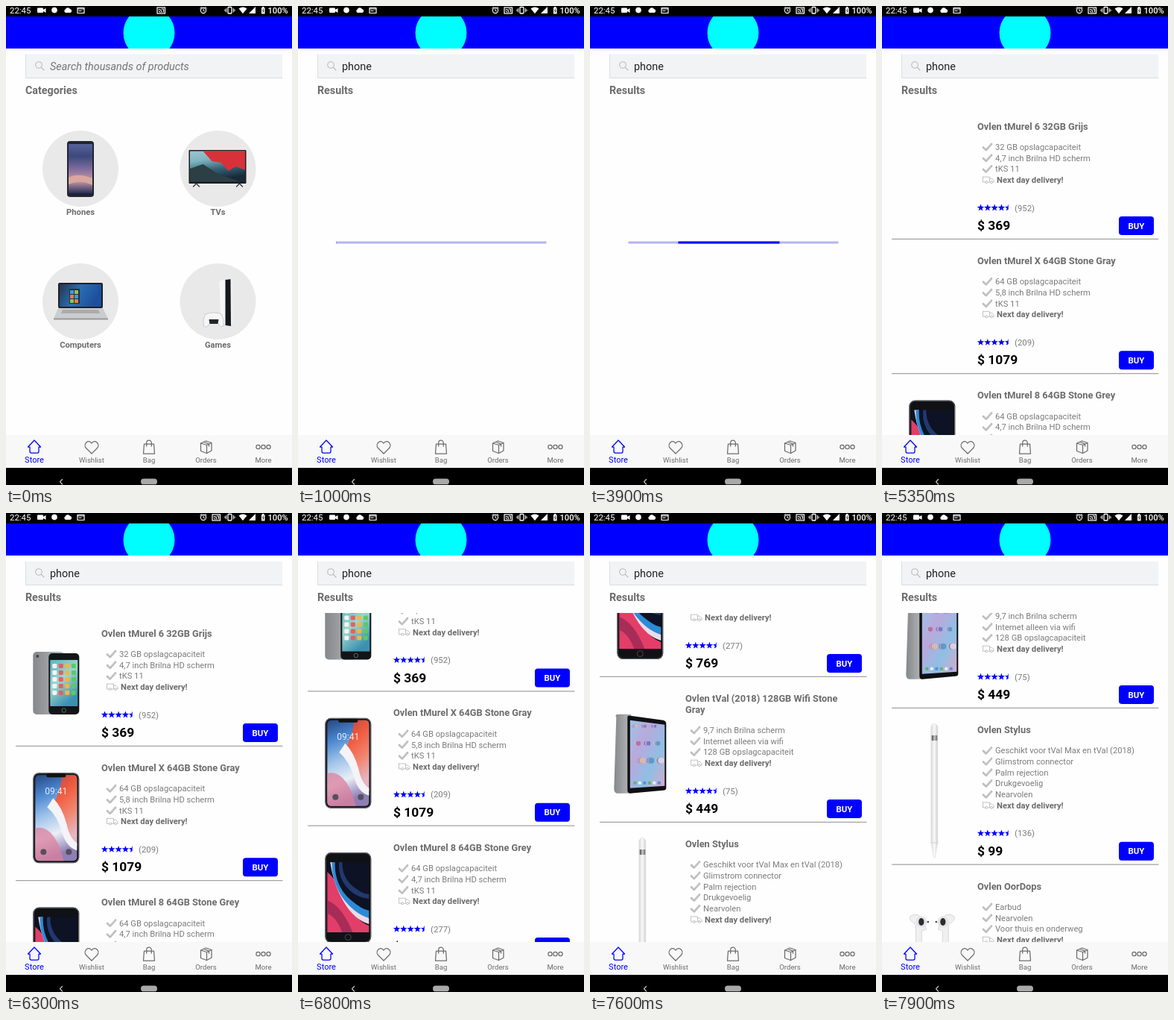
An HTML page for the animation above (8000 ms loop, 384x642 px).

```html
<!DOCTYPE html>
<html lang="en">
<head>
<meta charset="utf-8">
<title>Shop search</title>
<style>
  html, body { margin: 0; width: 100%; height: 100%; overflow: hidden; background: #fdfefd; }
  svg { display: block; width: 384px; height: 642px; font-family: Roboto, Arial, sans-serif; }
  .bold { font-weight: 700; }
  .mid { text-anchor: middle; }
  .line { fill: none; stroke-linecap: round; stroke-linejoin: round; }
</style>
</head>
<body>
<svg id="stage" viewBox="0 0 384 642" xmlns="http://www.w3.org/2000/svg"></svg>
<script>
const LOOP = 8000;
const BLUE = '#0000fe';
const GRAY = '#6c6c6c';
const SOFT = '#7c7c7c';

const rect = (x, y, w, h, fill, rx = 0, more = '') =>
  `<rect x="${x}" y="${y}" width="${w}" height="${h}" fill="${fill}" rx="${rx}" ${more}/>`;
const circle = (x, y, r, fill, more = '') =>
  `<circle cx="${x}" cy="${y}" r="${r}" fill="${fill}" ${more}/>`;
const path = (d, fill, more = '') => `<path d="${d}" fill="${fill}" ${more}/>`;
const line = (d, color, width = 1) =>
  `<path class="line" d="${d}" stroke="${color}" stroke-width="${width}"/>`;
const text = (x, y, size, fill, str, cls = '', more = '') =>
  `<text x="${x}" y="${y}" font-size="${size}" fill="${fill}" class="${cls}" ${more}>${str}</text>`;
const group = (x, y, body, more = '') => `<g transform="translate(${x} ${y})" ${more}>${body}</g>`;
const gradient = (id, x2, y2, ...colors) =>
  `<linearGradient id="${id}" x1="0" y1="0" x2="${x2}" y2="${y2}">` +
  colors.map((c, i) => `<stop offset="${i / (colors.length - 1)}" stop-color="${c}"/>`).join('') +
  '</linearGradient>';

const defs = `<defs>
  ${gradient('dusk', 0, 1, '#56629b', '#3c487c', '#7d6b9c', '#c99aa5', '#27305c')}
  ${gradient('lake', 0.3, 1, '#9fc4cf', '#7db4c2', '#356474', '#172b3b')}
  ${gradient('desk', 1, 0.3, '#26364f', '#2b6cb4', '#1c4f9c')}
  ${gradient('aqua', 0.5, 1, '#5fb3bd', '#9fd6cf', '#3b91b0')}
  ${gradient('sky', 0.2, 1, '#27467f', '#4a86cf', '#9fc3ea', '#e9eef6', '#8e7fb4')}
  ${gradient('fire', 0.3, 1, '#b8474a', '#ee5a3f', '#f2836c', '#e6b5c0')}
  ${gradient('paint', 1, 1, '#9cc4e6', '#b9a9dc', '#8fbfe4', '#d9a9c9')}
  ${gradient('steel', 1, 0, '#85878b', '#b9babd')}
  ${gradient('stick', 1, 0, '#d8d8d8', '#fafafa', '#cfcfcf')}
  <clipPath id="head"><rect y="14" width="384" height="43"/></clipPath>
  <clipPath id="list"><rect y="134" width="384" height="441"/></clipPath>
</defs>`;

// Fixed frame of the app

const castIcon = rect(-5, -4, 10.5, 8, 'none', 0, 'stroke="#fff" stroke-width="1.2"') +
  line('M-3 -1.5A4 4 0 0 1 1 2.5M-3 .8A2 2 0 0 1 -1.2 2.5M1 -2H3.5V2', '#fff', 1.1);

function statusBar() {
  return rect(0, 0, 384, 14, '#000') +
    text(5, 9.8, 11.4, '#fff', '22:45') +
    rect(42, 2.5, 8, 6.5, '#fff', 1) + path('M49 5.5L53.5 3V9L49 6.5Z', '#fff') +
    circle(65, 5.6, 3.8, '#fff') +
    path('M80 9A2.4 2.4 0 0 1 79.6 4.6A3.6 3.6 0 0 1 86 4A2.6 2.6 0 0 1 86.5 9Z', '#fff') +
    line('M96 2.5H105V9.5H96ZM96 4H105M98 6.5H101', '#fff', 1.2) +
    circle(265, 6, 3.6, 'none', 'stroke="#fff" stroke-width="1.1"') +
    line('M265 4V6.3L266.5 7M260.8 3L262.6 1.6M267.4 1.6L269.2 3', '#fff') +
    rect(298, 1.5, 5, 8.5, 'none', 1, 'stroke="#fff" stroke-width="1.3"') +
    line('M295.7 3.5V8M294 4.8V6.8M305.3 3.5V8M307 4.8V6.8', '#fff') +
    path('M312.5 3.6Q318 -.6 323.5 3.6L318 10.3Z', '#fff') +
    path('M335 1V10H326Z', '#fff') +
    path('M343 2.2H344.2V1H346.2V2.2H347.5V10.5H343Z', '#fff') +
    line('M345.6 4L344.6 6.4H346L345 8.6', '#000', 0.8) +
    text(351.5, 9.8, 11.2, '#fff', '100%', '', 'font-weight="500"');
}

function header() {
  return rect(0, 14, 384, 43, BLUE) + circle(192, 36, 34.5, '#00fdff', 'clip-path="url(#head)"');
}

function tab(x, label, icon, color = GRAY, size = 9.6) {
  return group(x, 591, line(icon, color, 1.25)) + text(x, 611.8, size, color, label, 'mid');
}

const ring = x => `M${x - 2.6} 0a2.6 2.6 0 1 0 5.2 0a2.6 2.6 0 1 0 -5.2 0`;

function tabBar() {
  return rect(0, 575, 384, 44, '#f7f8f7') +
    tab(38, 'Store', 'M-8.5 0L0 -9L8.5 0H6V6Q6 8 4 8H-4Q-6 8 -6 6V0Z', BLUE, 11) +
    tab(115, 'Wishlist', 'M0 9L-7.5 1.5C-12 -4 -4.5 -11 0 -5C4.5 -11 12 -4 7.5 1.5Z') +
    tab(192, 'Bag', 'M-6.5 -4H6.5L7.5 9H-7.5ZM-3.3 -1V-5.5A3.3 3.3 0 0 1 3.3 -5.5V-1') +
    tab(268.5, 'Orders', 'M-7 -5L0 -8L7.5 -5.5V5L1 8.5L-7 5.5ZM-7 -5L1 -2.5L7.5 -5.5M1 -2.5V8.5M-3 -6.6L4 -4V-1') +
    tab(345.5, 'More', ring(-7) + ring(0) + ring(7));
}

function navBar() {
  return rect(0, 619, 384, 23, '#000') +
    line('M75.5 634.5L72.5 637.7L75.5 641', '#ccc', 1.2) +
    rect(181, 633.5, 22, 7.8, '#a9a9a9', 3.9);
}

function searchBox() {
  return rect(26, 65, 345, 31.5, '#f1f3f4') + line('M26.5 65V96.5H371', '#dcdfe0') +
    circle(44, 79, 4.3, 'none', 'stroke="#b9bcbc" stroke-width="1.1"') +
    line('M47.2 82.2L51 86', '#b9bcbc', 1.2) +
    text(59, 86, 14.4, '#757575', 'Search thousands of products', '', 'id="hint" font-style="italic"') +
    text(59, 86, 14.4, '#222', '', '', 'id="query"');
}

// Store page

function category(x, y, label, art) {
  return group(x, y, circle(0, 0, 51, '#e9e9e9') + art + text(0, 61.5, 11.2, GRAY, label, 'bold mid'));
}

function store() {
  const phone = rect(-18, -37, 36, 75, '#22242f', 4) + rect(-16, -33, 32, 66, 'url(#dusk)', 1) +
    path('M-16 12Q-4 5 16 13V22Q0 14 -16 21Z', '#dba6a0');
  const tv = rect(-39, -25, 77, 45, '#1c1d20', 1) + rect(-37.5, -23.5, 74, 41, 'url(#lake)') +
    path('M-20 -23.5H36.5V2L24 -3L14 3L4 -8L-8 -10Z', '#d7323a') +
    path('M-37.5 0L-20 -6L2 8L30 17.5H-37.5Z', '#2b3f45') +
    line('M-29 20L-33 24M-29 20L-25 24M29 20L25 24M29 20L33 24', '#333', 1.3);
  const laptop = rect(-30, -25, 60, 34, '#1d2027', 2) + rect(-28, -23, 56, 30, 'url(#desk)') +
    rect(-15, -17, 14, 20, '#24303f') +
    [0, 1, 2, 3, 4, 5].map(i => rect(-14 + i % 2 * 6, -15 + (i >> 1) * 6, 5, 5, ['#3d9ad8', '#8fc257', '#d8834c'][i % 3])).join('') +
    path('M-30 9H30L37 23H-36Z', '#cbccce') + path('M-24 11H24L26 16H-26Z', '#a9abaf') +
    rect(-36, 22.5, 73, 2, '#999');
  const console = path('M2 -27Q8 -31 11 -28L12 29L4 32Z', '#f5f6f8') +
    path('M10 -29L18 -30Q20 0 18 33L10 32Z', '#17181c') + path('M17 -30H20L20.5 31L17.5 33Z', '#eceef2') +
    path('M-17 17Q-5 13 5 17Q9 25 7 33Q4 36 0 29H-11Q-16 37 -19 33Q-21 25 -17 17Z', '#f6f6f8', 'stroke="#b8bac0" stroke-width=".7"') +
    path('M-12 24H1L0 30H-11Z', '#25262b');
  return category(100, 218, 'Phones', phone) + category(284.5, 218, 'TVs', tv) +
    category(100, 396, 'Computers', laptop) + category(284.5, 396, 'Games', console);
}

// Product pictures, centred on 0,0

function handset(screen, top, art) {
  return rect(-31, -60, 62, 121, '#101114', 8) +
    rect(-30.3, -59.3, 60.6, 119.6, 'none', 7.5, 'stroke="#77787c" stroke-width=".9"') +
    rect(-28, -60 + top, 56, 121 - top * 2, screen, top < 8 ? 5 : 0) + art;
}

function pairArt() {
  let apps = '';
  for (let i = 0; i < 20; i++)
    apps += rect(-5 + i % 4 * 8.5, -26 + (i >> 2) * 9, 6, 6, ['#f4f4f4', '#5bcb62', '#f2b544', '#e46060'][i * 7 % 4], 1.4);
  return rect(-31, -42, 42, 84, 'url(#steel)', 5) + circle(-25, -36, 2, '#444') +
    rect(-10, -40, 41, 82, '#131417', 5) + rect(-8, -31, 37, 62, 'url(#aqua)') + apps +
    circle(10.5, 36.5, 2.8, 'none', 'stroke="#777" stroke-width=".8"');
}

const wave = path('M8 -57H23Q28 -57 28 -52V38Q16 34 10 12Q4 -8 -4 -18Q6 -34 8 -57Z', 'url(#fire)') +
  path('M-12 -14Q2 -2 8 20Q14 40 28 44V34Q18 28 14 8Q8 -14 -4 -26Z', '#f3f3f8') +
  path('M-28 14Q-10 10 2 34Q8 46 10 58H-23Q-28 58 -28 52Z', '#dd7f9c', 'opacity=".75"') +
  rect(-13, -59, 26, 5, '#101114', 2) + text(0, -31, 12, '#fff', '09:41', 'mid', 'opacity=".85"') +
  circle(-17, 46, 4, '#55505c') + circle(17, 46, 4, '#55505c');
const swirl = path('M-28 -34Q-12 -20 4 14Q12 32 28 38V47H-28Z', '#e23e68') +
  path('M-28 4Q-8 12 6 47H-8Q-16 26 -28 22Z', '#a82c58') +
  path('M-18 -47Q-20 -14 2 8Q20 24 28 28V36Q8 30 -6 6Q-20 -18 -24 -47Z', '#e9dcea') +
  path('M-18 -47Q-18 -14 4 4Q18 16 28 18V28Q8 22 -8 0Q-22 -22 -22 -47Z', '#2c8bd6') +
  path('M-8 -47Q-8 -24 10 -12Q20 -4 28 -4V2Q8 0 -4 -16Q-14 -30 -12 -47Z', '#22386f') +
  circle(0, 53.5, 4, 'none', 'stroke="#55565a" stroke-width=".8"');

function tabletArt() {
  let blobs = '';
  for (let i = 0; i < 34; i++)
    blobs += circle(-9 + i * 17 % 38, -37 + i * 23 % 69, 2 + i % 3, ['#d95f97', '#3f90d4', '#f1c9a0', '#6c5cb6', '#dfeaf4'][i % 5], 'opacity=".8"');
  const dock = [0, 1, 2, 3, 4, 5].map(i => rect(-9 + i * 6.5, 37, 4, 4, ['#58b96a', '#eee', '#538fe0'][i % 3], 1)).join('');
  return path('M-32 -49Q-35 -53 -28 -53H-12V53H-30Q-35 53 -35 47Z', 'url(#steel)') +
    path('M-17 -49Q-17 -52 -13 -51L31 -45Q35 -44 35 -40V46Q35 49 31 49L-13 53Q-17 53 -17 49Z', '#0f1013') +
    path('M-13.5 -45L33 -39V43L-13.5 46Z', 'url(#paint)') + blobs + dock;
}

const penArt = group(3, 0, path('M-4.5 -86Q0 -94 4.5 -86V70L1 90H-1L-4.5 70Z', 'url(#stick)', 'stroke="#ddd" stroke-width=".5"') +
  rect(-4.5, -74, 9, 7, '#b9b9b9') + rect(-3, -74, 1.5, 7, '#555') + rect(2, -74, 1.5, 7, '#777') +
  line('M-4.5 70H4.5', '#ccc', 0.8));

const bud = path('M-8 -9Q-12 -30 -24 -29Q-33 -27 -29 -21L-22 -15V27Q-18 31 -14 27V-7Z', '#f0f0f0', 'stroke="#ccc" stroke-width=".7"') +
  circle(-14.5, -19, 7.5, '#e4e4e4') + `<ellipse cx="-14.5" cy="-19" rx="3.6" ry="5" fill="#2c2c30"/>` + circle(-5.5, -19, 1.3, '#444');
const budsArt = bud + `<g transform="scale(-1 1)">${bud}</g>`;

// Result list

const PHONE_SCREEN = ' inch Brilna HD scherm';
const products = [
  { title: ['Ovlen tMurel 6 32GB Grijs'], specs: ['32 GB opslagcapaciteit', '4,7' + PHONE_SCREEN, 'tKS 11'],
    votes: 952, price: 369, art: pairArt(), loaded: 5500 },
  { title: ['Ovlen tMurel X 64GB Stone Gray'], specs: ['64 GB opslagcapaciteit', '5,8' + PHONE_SCREEN, 'tKS 11'],
    votes: 209, price: 1079, art: handset('url(#sky)', 3, wave), loaded: 5600 },
  { title: ['Ovlen tMurel 8 64GB Stone Grey'], specs: ['64 GB opslagcapaciteit', '4,7' + PHONE_SCREEN, 'tKS 11'],
    votes: 277, price: 769, art: handset('#0d1224', 13, swirl), loaded: 5250 },
  { title: ['Ovlen tVal (2018) 128GB Wifi Stone', 'Gray'], specs: ['9,7 inch Brilna scherm', 'Internet alleen via wifi', '128 GB opslagcapaciteit'],
    votes: 75, price: 449, art: tabletArt(), loaded: 5600 },
  { title: ['Ovlen Stylus'], specs: ['Geschikt voor tVal Max en tVal (2018)', 'Glimstrom connector', 'Palm rejection', 'Drukgevoelig', 'Nearvolen'],
    votes: 136, price: 99, art: penArt, loaded: 5600 },
  { title: ['Ovlen OorDops'], specs: ['Earbud', 'Nearvolen', 'Voor thuis en onderweg'],
    votes: 318, price: 159, art: budsArt, loaded: 5600 },
];

const ROW = 14.7;
const tick = line('M-5.5 .5L-1.8 4L5.5 -4', '#bdbdbd', 2.8) + line('M-4 .5L-1.8 2.4L4.5 -3.5', '#dcdcdc', 0.8);
const truck = line('M-7 -4H2V3H-1M-4 3H-7V-4M2 -2H5L7.5 .5V3H6M-4 3a1.5 1.5 0 1 0 3 0a1.5 1.5 0 1 0 -3 0M3 3a1.5 1.5 0 1 0 3 0a1.5 1.5 0 1 0 -3 0', '#bcbcbc', 0.9);

function starPath(r) {
  const pts = Array.from({ length: 10 }, (_, i) => {
    const a = i * Math.PI / 5, d = i % 2 ? r * 0.42 : r;
    return `${(Math.sin(a) * d).toFixed(2)} ${(-Math.cos(a) * d).toFixed(2)}`;
  });
  return 'M' + pts.join('L') + 'Z';
}

function stars(y) {
  let out = '';
  for (let i = 0; i < 4; i++) out += group(132.5 + i * 9.3, y, path(starPath(4.9), BLUE));
  return out + group(169.7, y, path('M0 -4.9V2.1L-2.9 4L-2 .65L-4.7 -1.5L-1.2 -1.7Z', BLUE));
}

function results() {
  let y = 161, out = '';
  products.forEach((p, n) => {
    const top = y;
    p.title.forEach((s, i) => out += text(128, top + 4.5 + i * ROW, 12.8, GRAY, s, 'bold'));
    y += 28 + (p.title.length - 1) * ROW;
    for (const s of p.specs) {
      out += group(141.5, y, tick) + text(152, y + 4, 11.2, SOFT, s);
      y += ROW;
    }
    out += group(142.5, y, truck) + text(154, y + 4, 11.2, GRAY, 'Next day delivery!', 'bold');
    out += stars(y + 37.4) + text(178, y + 41.4, 11.4, SOFT, `(${p.votes})`);
    out += text(128, y + 67, 17.4, '#000', `$ ${p.price}`, 'bold');
    out += rect(318, y + 48.8, 47, 25, BLUE, 4) + text(341.5, y + 65.4, 11.4, '#fff', 'BUY', 'bold mid');
    y += 79.2;
    out += line(`M13.5 ${y}H371`, '#a2a2a2', 1.2);
    out += group(67.3, (top + y) / 2 - 8.7, p.art, `id="art${n}"`);
    y += 29;
  });
  return out;
}

document.getElementById('stage').innerHTML = defs + rect(0, 0, 384, 642, '#fdfefd') +
  `<g id="store">${store()}</g>` +
  `<g clip-path="url(#list)"><g id="results">${results()}</g></g>` +
  `<g id="loader">${rect(51.5, 315.5, 282, 3, '#b4b4f6')}<rect id="bar" y="315.5" height="3" fill="${BLUE}"/></g>` +
  searchBox() + text(26, 118, 14.3, GRAY, '', 'bold', 'id="heading"') +
  tabBar() + navBar() + statusBar() + `<g id="cast">${castIcon}</g>` + header();

// Timeline

const $ = id => document.getElementById(id);
const SEARCH_AT = 850, RESULTS_AT = 5050;
const typing = [250, 350, 450, 550, 650];
const scroll = [[6550, 0], [6800, 73], [7300, 300], [8000, 657]];
const castX = [[100, 208], [400, 282]];
// Both ends of the loading bar; equal times make a jump
const barLeft = [[1000, 51], [1300, 51], [1700, 63], [3050, 63], [3500, 333], [3500, 51], [3650, 51], [3900, 118], [4350, 333], [4350, 51], [4600, 51], [5050, 200]];
const barRight = [[1000, 51], [1700, 279], [3050, 279], [3200, 333], [3500, 333], [3500, 51], [3900, 254], [4080, 333], [4350, 333], [4350, 51], [4900, 333]];

function at(steps, t) {
  if (t <= steps[0][0]) return steps[0][1];
  for (let i = 1; i < steps.length; i++) {
    const [t0, a] = steps[i - 1], [t1, b] = steps[i];
    if (t < t1) return a + (b - a) * (t - t0) / (t1 - t0);
  }
  return steps[steps.length - 1][1];
}

const show = (id, on) => $(id).setAttribute('visibility', on ? 'visible' : 'hidden');

function draw(t) {
  const inStore = t < SEARCH_AT;
  show('store', inStore);
  show('loader', !inStore && t < RESULTS_AT);
  show('results', t >= RESULTS_AT);
  show('hint', t < 150);
  $('heading').textContent = inStore ? 'Categories' : 'Results';
  $('query').textContent = 'phone'.slice(0, typing.filter(k => t >= k).length);
  $('cast').setAttribute('transform', `translate(${at(castX, t)} 6)`);

  const left = at(barLeft, t);
  $('bar').setAttribute('x', left);
  $('bar').setAttribute('width', Math.max(0, at(barRight, t) - left));

  $('results').setAttribute('transform', `translate(0 ${-at(scroll, t)})`);
  products.forEach((p, n) => show('art' + n, t >= RESULTS_AT && t >= p.loaded));
}

function frame() {
  draw(performance.now() % LOOP);
  requestAnimationFrame(frame);
}
frame();
</script>
</body>
</html>
```
